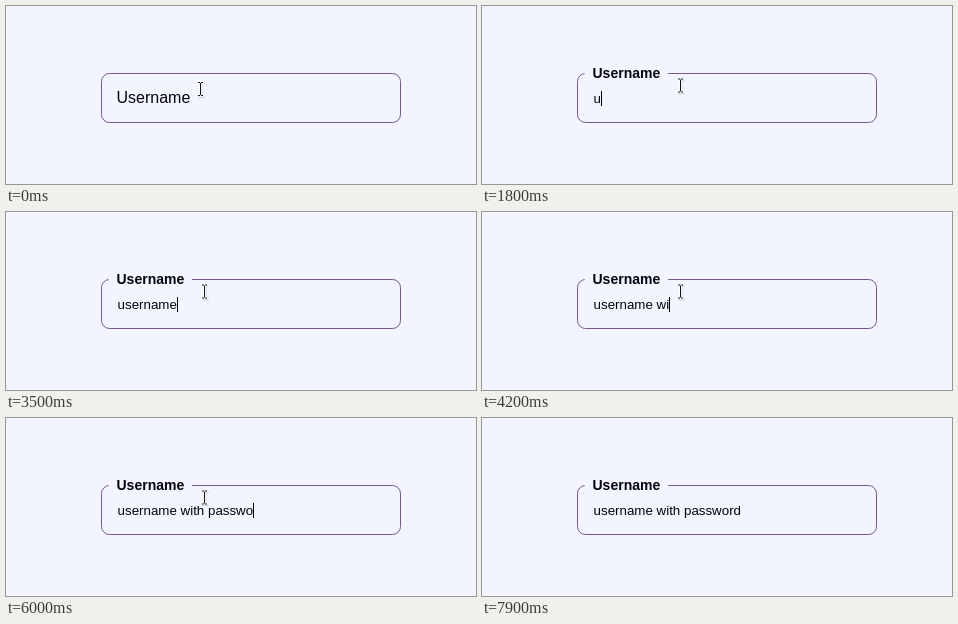
These frames come from a looping animation (470 by 178 pixels, 8 s). An HTML page:

```html
<!DOCTYPE html>
<html lang="en">
<head>
<meta charset="utf-8">
<title>Floating label</title>
<style>
html, body { margin: 0; width: 100%; height: 100%; overflow: hidden; background: #f2f4ff; }
svg { display: block; }
text { font-family: "Liberation Sans", Arial, sans-serif; fill: #050508; white-space: pre; }
#value { font-size: 13.333px; }
</style>
</head>
<body>
<svg width="470" height="178" viewBox="0 0 470 178">
  <rect width="470" height="178" fill="#f2f4ff"/>
  <rect x="95.5" y="67.5" width="299" height="49" rx="8" fill="none" stroke="#74588c"/>
  <rect id="patch" fill="#f2f4ff"/>
  <text id="value" x="111.6" y="97"></text>
  <rect id="caret" y="85" width="1" height="15" fill="#000"/>
  <text id="label" x="110.5">Username</text>
  <g id="pointer" fill="none">
    <path d="M-2 -5.5H4M1 -5V8M-2 8H4" stroke="#777" stroke-opacity=".28" stroke-width="2"/>
    <path d="M-3 -6.5H3M0 -6V6M-3 6.5H3" stroke="#fff" stroke-width="2.6"/>
    <path d="M-2.5 -6.5H-.5M.5 -6.5H2.5M0 -6V6M-2.5 6.5H-.5M.5 6.5H2.5" stroke="#111"/>
  </g>
</svg>
<script>
const LOOP = 8000, FOCUS = 200, FLOAT = 300, BLINK = 500;
const TEXT = "username with password";
const KEYS = [1700, 1930, 2180, 2430, 2760, 3000, 3200, 3420, 3650, 3900, 4180,
  4450, 4700, 4950, 5350, 5510, 5630, 5750, 5880, 6000, 6120, 6250];
const [patch, value, caret, label, pointer] =
  ["patch", "value", "caret", "label", "pointer"].map(id => document.getElementById(id));

const clamp = x => Math.min(1, Math.max(0, x));
const mix = (a, b, p) => a + (b - a) * p;
const smooth = p => p * p * (3 - 2 * p);
const phase = (t, from, to) => smooth(clamp((t - from) / (to - from)));

function set(el, attrs) {
  for (const k in attrs) el.setAttribute(k, attrs[k]);
}

function drawLabel(t) {
  const p = phase(t, FOCUS, FOCUS + FLOAT);
  const y = mix(97, 72, p);
  set(label, {
    y,
    "font-size": mix(16, 14, p),
    "font-weight": p > 0.5 ? 700 : 400
  });
  const w = label.getComputedTextLength();
  set(patch, { x: 102.7, y: y - 14, width: w + 15.6, height: 18 });
}

function drawInput(t) {
  const count = KEYS.filter(k => k <= t).length;
  value.textContent = TEXT.slice(0, count);
  const last = count ? KEYS[count - 1] : FOCUS;
  const lit = t >= FOCUS && Math.floor((t - last) / BLINK) % 2 === 0;
  const end = count ? value.getComputedTextLength() : 0;
  set(caret, { x: Math.round(111.6 + end - 0.3), opacity: lit ? 1 : 0 });
}

function drawPointer(t) {
  const go = phase(t, 100, 500);
  const leave = clamp((t - 6800) / 500);
  const x = mix(194.5, 198.5, go) + 4 * leave;
  const y = mix(83, 79.5, go) + 115 * leave * leave;
  set(pointer, { transform: `translate(${x} ${y})` });
}

function draw(t) {
  drawLabel(t);
  drawInput(t);
  drawPointer(t);
}

const start = performance.now();
function tick() {
  draw((performance.now() - start) % LOOP);
  requestAnimationFrame(tick);
}
draw(0);
requestAnimationFrame(tick);
</script>
</body>
</html>
```
